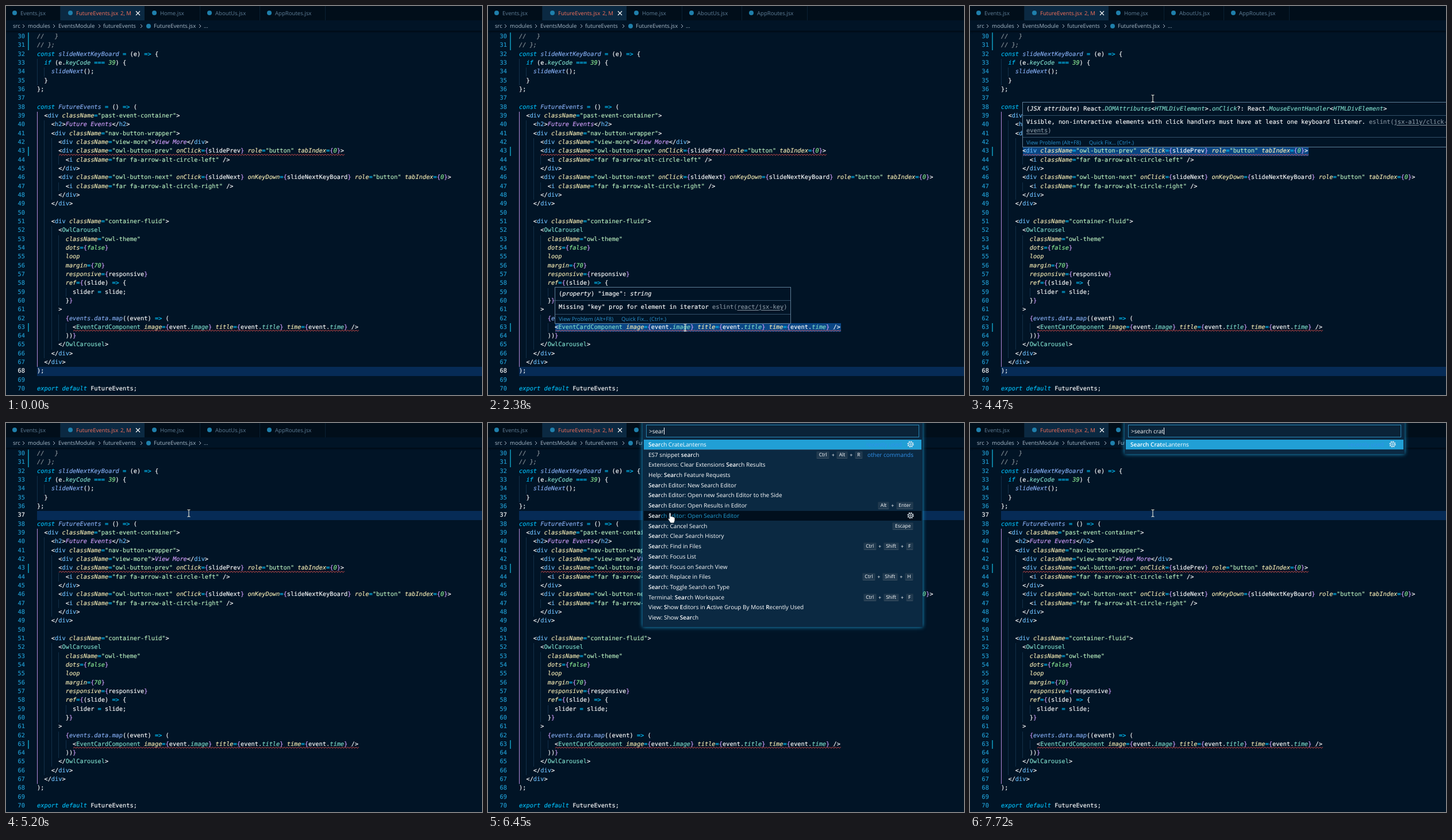
Animation, 828 px wide and 677 px high, one loop 8000 ms. Source, as an HTML page:

```html
<!DOCTYPE html>
<html lang="en">
<head>
<meta charset="utf-8">
<title>Editor command palette</title>
<style>
  html, body { margin: 0; width: 100%; height: 100%; overflow: hidden; background: #011426; }
  #stage {
    position: relative; width: 828px; height: 677px; overflow: hidden; background: #011426;
    font: 10px/16px "Open Sans", "Noto Sans", sans-serif; color: #fff;
    text-rendering: geometricPrecision; white-space: nowrap;
  }
  #stage div, #stage svg, .code span { position: absolute; }
  #selections, #lines, #hovers, #rows { left: 0; top: 0; }
  .mono, .code {
    font: 10.32px/15.33px "DejaVu Sans Mono", "Noto Sans Mono", monospace;
    white-space: pre; -webkit-text-stroke: .15px;
  }
  svg { overflow: visible; }

  #bar { left: 0; top: 0; width: 828px; height: 25px; background: #010e1a; font-size: 9.6px; }
  .tab { top: 0; height: 25px; box-sizing: border-box; border-right: 1px solid #0a2133; }
  .tab.on { background: #0b2942; border: 0; }
  #crumbs { left: 0; top: 25px; width: 828px; height: 18px; background: #011426; box-shadow: 0 2px 3px #000a14; font-size: 9.6px; }
  .dot { width: 8px; height: 8px; border-radius: 50%; background: #1f7fab; }

  .code { left: 54px; height: 15.33px; }
  .num { width: 33px; left: 0; text-align: right; color: #219fd5; }
  .num.on { color: #fff; }
  .guide { top: 0; width: 1px; height: 15.4px; background: #12304a; }
  .mod { left: 37.5px; width: 2px; height: 15.4px; background: #0c7d9d; }
  #active { left: 54px; top: 184px; width: 1px; height: 444px; background: #b48add; }
  #lineHi { left: 54px; width: 774px; height: 15.3px; background: #062b56; }
  .sel { width: 497px; height: 15.3px; background: #0a4684; }
  #caret { left: 54px; top: 153.5px; width: 1.6px; height: 15px; background: #9fd6f0; }

  .cm { color: #8f989e; font-style: italic; }
  .str { color: #bcf0c0; }
  .txt { color: #d29ffc; font-style: italic; }
  .key { color: #00bff9; font-style: italic; }
  .op { color: #00bff9; }
  .comp { color: #7fdbca; }
  .tag { color: #6dbdfa; }
  .attr { color: #f7ecb5; font-style: italic; }
  .fn { color: #87aff4; font-style: italic; }
  .prop { color: #7fdbca; font-style: italic; }
  .lit { color: #8dec95; font-style: italic; }
  .brace { color: #d29ffc; }

  .hover { box-sizing: border-box; border: 1px solid #5f7e97; background: #011426; }
  .rule { left: 0; width: 100%; height: 1px; background: #33506a; }
  .hover u { text-underline-offset: 2px; }
  .dim { color: #8794a0; }
  .link { color: #2b93cf; font-size: 9.4px; }

  #palette { left: 269px; top: -4px; width: 487px; background: #0b2942; box-shadow: 0 0 7px #219fd5; }
  #input {
    left: 6px; top: 7px; width: 475px; height: 22px; box-sizing: border-box; padding-left: 4px;
    border: 1px solid #2a86b5; background: #0a2338; line-height: 20px; white-space: pre;
  }
  #input i { display: inline-block; width: 1px; height: 12px; background: #fff; vertical-align: -2px; }
  .row {
    left: 2px; width: 483px; height: 17.73px; line-height: 17.2px; box-sizing: border-box;
    padding: 0 14px 0 8px; display: flex; align-items: center;
  }
  .row .name { flex: 1; }
  .row b { font-weight: 600; color: #fff; }
  .row.first { background: #219fd5; }
  .row.over { background: #010f1d; color: #219fd5; }
  .row.split { border-top: 1px solid #2a4a64; }
  .row .label { color: #3090ea; margin-left: 8px; }
  .row .plus { width: 12px; text-align: center; font-size: 9px; }
  .row .chord { display: flex; align-items: center; margin-left: 9px; color: #fff; }
  .row kbd {
    font: 8.5px/11px "Open Sans", "Noto Sans", sans-serif; padding: 0 3.5px; border: 1px solid #1a3347;
    border-bottom-color: #3b5061; border-radius: 2px; background: #203a50;
  }
  #stage .row svg { position: static; margin: 0 -1px 0 9px; }
</style>
</head>
<body>
<div id="stage">
  <div id="lineHi"></div>
  <div id="selections"></div>
  <div id="lines"></div>
  <div id="active"></div>
  <div id="caret"></div>
  <div id="crumbs"></div>
  <div id="bar"></div>
  <div id="hovers"></div>
  <div id="palette"><div id="input"></div><div id="rows"></div></div>
  <svg id="beam" width="1" height="1"><path d="M-2.5-6H-1L0-5 1-6H2.5M0-5V5M-2.5 6H-1L0 5 1 6H2.5" fill="none" stroke="#f1efe0" stroke-width="1.1"/></svg>
  <svg id="hand" width="1" height="1" style="left:313px;top:155px"><path d="M2.2 2.2Q3.7.2 5 2.2V8Q6.5 6.7 7.4 8.2 9 7.3 9.7 9 11.7 8.4 12 10.5V14.5L10.5 19H4.5L1 13.5Q-.5 11 1 10.7L2.3 12Z" fill="#fff" stroke="#10202c" stroke-width=".8"/></svg>
</div>
<script>
const $ = id => document.getElementById(id);
const CHAR = 6.21, LINE = 15.325, FIRST = 30, LOOP = 8000;
const lineTop = n => 46.1 + (n - FIRST) * LINE;

function add(parent, cls, style = {}, html = '') {
  const el = document.createElement('div');
  el.className = cls;
  for (const k in style) el.style[k] = typeof style[k] === 'number' ? style[k] + 'px' : style[k];
  el.innerHTML = html;
  return parent.appendChild(el);
}
const put = (parent, x, mid, html, cls = '', color = '') =>
  add(parent, cls, { left: x, top: mid - 8, lineHeight: '16px', color }, html);
const esc = s => s.replace(/&/g, '&amp;').replace(/</g, '&lt;');

// Tabs and breadcrumbs
const tabs = [[0, 95, 'Events.jsx'], [95, 146, 'FutureEvents.jsx'], [241, 97, 'Home.jsx'],
  [338, 104, 'AboutUs.jsx'], [442, 114, 'AppRoutes.jsx']];
tabs.forEach(([x, w, name], i) => {
  const on = i === 1, tab = add($('bar'), on ? 'tab on' : 'tab', { left: x, width: w });
  const pad = [11, 13, 13, 12, 12][i];
  add(tab, 'dot', { left: pad, top: 8 });
  put(tab, pad + 14, 12.5, name, '', on ? '#f5705a' : '#5f7e97');
  if (on) {
    put(tab, 104, 12.5, '2, M', '', '#f5705a');
    add(tab, '', { left: 131, top: 9 }, '<svg width="8" height="8"><path d="M0 0 7 7M7 0 0 7" stroke="#fff" stroke-width="1.1"/></svg>');
  }
});
const crumbs = [[12, 'src'], [38, 'modules'], [91, 'EventsModule'], [169, 'futureEvents'], [257, 'FutureEvents.jsx'], [344, '...']];
crumbs.forEach(([x, s]) => put($('crumbs'), x, 10, s, '', '#a7b9c8'));
for (const x of [30, 83, 162, 235, 337])
  add($('crumbs'), '', { left: x - 1, top: 7 }, '<svg width="4" height="7" style="left:0;top:0"><path d="M0 0 3 3 0 6" fill="none" stroke="#a7b9c8"/></svg>');
add($('crumbs'), 'dot', { left: 244, top: 6 });

// Code
const code = `//   }
// };
const slideNextKeyBoard = (e) => {
  if (e.keyCode === 39) {
    slideNext();
  }
};

const FutureEvents = () => (
  <div className="past-event-container">
    <h2>Future Events</h2>
    <div className="nav-button-wrapper">
      <div className="view-more">View More</div>
      <div className="owl-button-prev" onClick={slidePrev} role="button" tabIndex={0}>
        <i className="far fa-arrow-alt-circle-left" />
      </div>
      <div className="owl-button-next" onClick={slideNext} onKeyDown={slideNextKeyBoard} role="button" tabIndex={0}>
        <i className="far fa-arrow-alt-circle-right" />
      </div>
    </div>

    <div className="container-fluid">
      <OwlCarousel
        className="owl-theme"
        dots={false}
        loop
        margin={70}
        responsive={responsive}
        ref={(slide) => {
          slider = slide;
        }}
      >
        {events.data.map((event) => (
          <EventCardComponent image={event.image} title={event.title} time={event.time} />
        ))}
      </OwlCarousel>
    </div>
  </div>
);

export default FutureEvents;`.split('\n');

const syntax = new RegExp([
  /(?<cm>\/\/.*)/, /(?<str>"[^"]*")/, /(?<txt>(?<=>)[A-Z]\w+ \w+)/,
  /(?<key>\b(?:const|if|export|default)\b)/, /(?<op>=>|=+)/,
  /(?<comp>(?<=<\/?)[A-Z]\w+)/, /(?<tag>(?<=<\/?)[a-z]\w*)/,
  /(?<attr>\w+(?==)|\bloop\b)/,
  /(?<fn>\w+(?= = \()|slideNext(?=\()|events\.data\.map)/,
  /(?<prop>(?<=\.)\w+)/, /(?<lit>\b(?:\d+|false)\b)/,
  /(?<brace>(?<==)\{|\{(?=events)|(?<=\S)\})/, /(?<plain>\w+|\S)/
].map(r => r.source).join('|'), 'g');

const nums = {};
code.forEach((text, i) => {
  const n = FIRST + i, top = lineTop(n);
  const indent = text ? text.search(/\S/) : n === 50 ? 4 : 0;
  let html = '';
  for (let c = 0; c < indent; c += 2) html += `<span class="guide" style="left:${c * CHAR}px"></span>`;
  for (const m of text.matchAll(syntax)) {
    const cls = Object.keys(m.groups).find(k => m.groups[k]);
    html += `<span class="${cls}" style="left:${m.index * CHAR}px">${esc(m[0])}</span>`;
  }
  add($('lines'), 'code', { top }, html);
  nums[n] = add($('lines'), 'num mono', { top }, n);
  if ([30, 31, 43, 63].includes(n)) add($('lines'), 'mod', { top });
});

function flagged(n, x) {
  let d = 'M0 2';
  for (let k = 1; k * 2.4 <= 497; k++) d += `L${(k * 2.4).toFixed(1)} ${k % 2 ? 0 : 2}`;
  add($('lines'), '', { left: x, top: lineTop(n) + 12.2 },
    `<svg width="497" height="3" style="left:0;top:0"><path d="${d}" fill="none" stroke="#ef5350" stroke-width=".9"/></svg>`);
  return add($('selections'), 'sel', { left: x, top: lineTop(n) });
}
const sel63 = flagged(63, 116.5), sel43 = flagged(43, 91.5);

// Hover cards
function card(x, y, w, h, rules) {
  const el = add($('hovers'), 'hover', { left: x, top: y, width: w, height: h });
  rules.forEach(top => add(el, 'rule', { top }));
  put(el, 6, h - 9.5, 'View Problem (Alt+F8)', 'link');
  put(el, 115, h - 9.5, 'Quick Fix... (Ctrl+.)', 'link');
  return el;
}
const cardKey = card(116, 489, 411, 64, [22, 46]);
put(cardKey, 6, 11, '(<i>property</i>) "image": <i>string</i>', 'mono');
put(cardKey, 6, 33.5, 'Missing "key" prop for element in iterator <span class="dim">eslint(<u>react/jsx-key</u>)</span>', 'mono');

const cardClick = card(91, 167, 760, 79, [22, 60]);
const generic = '&lt;<span class="prop">HTMLDivElement</span>&gt;';
put(cardClick, 6, 11, `(<i>JSX attribute</i>) React.<span class="prop">DOMAttributes</span>${generic}.<span class="prop">onClick</span>?: React.<span class="prop">MouseEventHandler</span>${generic}`, 'mono');
put(cardClick, 6, 33.5, 'Visible, non-interactive elements with click handlers must have at least one keyboard listener. <span class="dim">eslint(<u>jsx-a11y/click-</u></span>', 'mono');
put(cardClick, 6, 49, '<span class="dim"><u>events</u>)</span>', 'mono');

// Command palette: [name, keys]
const best = ['Search CrateLanterns'];
const startList = [best, ['Developer: Reload Window', 'Ctrl+R'],
  ['File: Save without Formatting', 'Ctrl+K Ctrl+Shift+S'], ['Pick Color', 'Alt+C P'], ['Convert Color', 'Alt+C C'],
  ['(Preview) PowerShell Command Explorer: Focus on PowerShell Commands View'], ['Add Browser Breakpoint'],
  ['Add Cursor Above', 'Ctrl+Alt+UpArrow'], ['Add Cursor Below', 'Ctrl+Alt+DownArrow'], ['Add Cursors To Bottom'],
  ['Add Cursors to Line Ends', 'Shift+Alt+I'], ['Add Cursors To Top'], ['Add Function Breakpoint'],
  ['Add Line Comment', 'Ctrl+K Ctrl+C'], ['Add Selection To Next Find Match', 'Ctrl+D'],
  ['Add Selection To Previous Find Match'], ['Auto Fix...', 'Shift+Alt+.'], ['Cache CSS class definitions']];
const foundList = [best, ['ES7 snippet search', 'Ctrl+Alt+R'], ['Extensions: Clear Extensions Search Results'],
  ['Help: Search Feature Requests'], ['Search Editor: New Search Editor'],
  ['Search Editor: Open new Search Editor to the Side'], ['Search Editor: Open Results in Editor', 'Alt+Enter'],
  ['Search Editor: Open Search Editor'], ['Search: Cancel Search', 'Escape'], ['Search: Clear Search History'],
  ['Search: Find in Files', 'Ctrl+Shift+F'], ['Search: Focus List'], ['Search: Focus on Search View'],
  ['Search: Replace in Files', 'Ctrl+Shift+H'], ['Search: Toggle Search on Type'],
  ['Terminal: Search Workspace', 'Ctrl+Shift+F'],
  ['View: Show Editors in Active Group By Most Recently Used'], ['View: Show Search']];
const gear = '<svg width="12" height="12" fill="none" stroke="#e4edf3"><circle cx="6" cy="6" r="4.8" stroke-width="1.6" stroke-dasharray="1.9 1.87"/><circle cx="6" cy="6" r="3.8"/><circle cx="6" cy="6" r="1.5"/></svg>';

function listFor(q) {
  if (!q) return startList;
  if (q.length < 5) return foundList;
  if (q.length < 8) return foundList.filter((_, i) => i !== 16);
  return foundList.slice(0, q.length < 9 ? 8 : 1);
}
function mark(name, q) {
  if (!q) return name;
  const low = name.toLowerCase(), at = low.indexOf('search');
  if (at < 0) return name.replace(/\b[SEAR]/g, '<b>$&</b>');
  const end = at + (low.startsWith(q, at) ? q.length : 6);
  return name.slice(0, at) + '<b>' + name.slice(at, end) + '</b>' + name.slice(end);
}
const chords = keys => keys.split(' ').map(c => '<span class="chord">' +
  c.split('+').map(k => `<kbd>${k}</kbd>`).join('<span class="plus">+</span>') + '</span>').join('');

let shown = null;
function drawPalette(q) {
  if (q === shown) return;
  shown = q;
  const list = listFor(q), split = q ? 1 : 5;
  $('input').innerHTML = '&gt;' + q + '<i></i>';
  $('rows').innerHTML = '';
  list.forEach(([name, keys], i) => {
    const cls = ['row', i === 0 && 'first', i === 7 && 'over', i === split && 'split'].filter(Boolean).join(' ');
    let html = `<span class="name">${mark(name, q)}</span>`;
    if (keys) html += chords(keys);
    if (i === 0) html += '<span class="label">recently used</span>';
    if (i === split) html += '<span class="label">other commands</span>';
    if (i === 0 || i === 7) html += gear;
    add($('rows'), cls, { top: 32.5 + i * 17.73 }, html);
  });
  $('palette').style.height = 40 + list.length * 17.73 + 'px';
}

// Timeline
const typed = [[5460, 0], [6080, 1], [6220, 2], [6340, 3], [6450, 4], [6700, 5], [7040, 6],
  [7240, 7], [7290, 8], [7450, 9], [7560, 10], [7720, 11]];
const path = [[980, 643, 651], [1540, 343, 566], [2350, 343, 566], [2380, 343, 560], [3160, 316, 267],
  [3400, 313, 257], [4010, 313, 257], [4530, 318, 157], [LOOP, 318, 157]];
const clamp = v => Math.max(0, Math.min(1, v));
const show = (el, on) => { el.style.visibility = on ? 'visible' : 'hidden'; };

function pointer(t) {
  const k = path.findIndex(p => p[0] > t), a = path[k - 1], b = path[k];
  const u = (t - a[0]) / (b[0] - a[0]), s = u * u * (3 - 2 * u);
  return [a[1] + (b[1] - a[1]) * s, a[2] + (b[2] - a[2]) * s];
}
function hover(el, sel, t, from, to, fade) {
  const on = t >= from && t < to;
  show(el, on);
  show(sel, on);
  el.style.opacity = 0.25 + 0.75 * clamp((t - from) / fade);
}

function render(t) {
  hover(cardKey, sel63, t, 1940, 2740, 60);
  hover(cardClick, sel43, t, 3700, 4500, 90);

  const line = t < 4690 ? 68 : 37;
  $('lineHi').style.top = lineTop(line) + 'px';
  for (const n of [37, 68]) nums[n].classList.toggle('on', n === line);
  show($('caret'), t >= 4690 && t < 5200);

  const open = t >= 5460;
  show($('palette'), open);
  if (open) drawPalette('search crat'.slice(0, typed.filter(s => s[0] <= t).pop()[1]));

  const overRow = t >= 5490 && t < 7450;
  show($('hand'), overRow);
  show($('beam'), t >= 980 && !overRow);
  if (t >= 980) {
    const [x, y] = pointer(t);
    $('beam').style.left = x + 'px';
    $('beam').style.top = y + 'px';
  }
}

const start = performance.now();
function tick() {
  render((performance.now() - start) % LOOP);
  requestAnimationFrame(tick);
}
tick();
</script>
</body>
</html>
```
